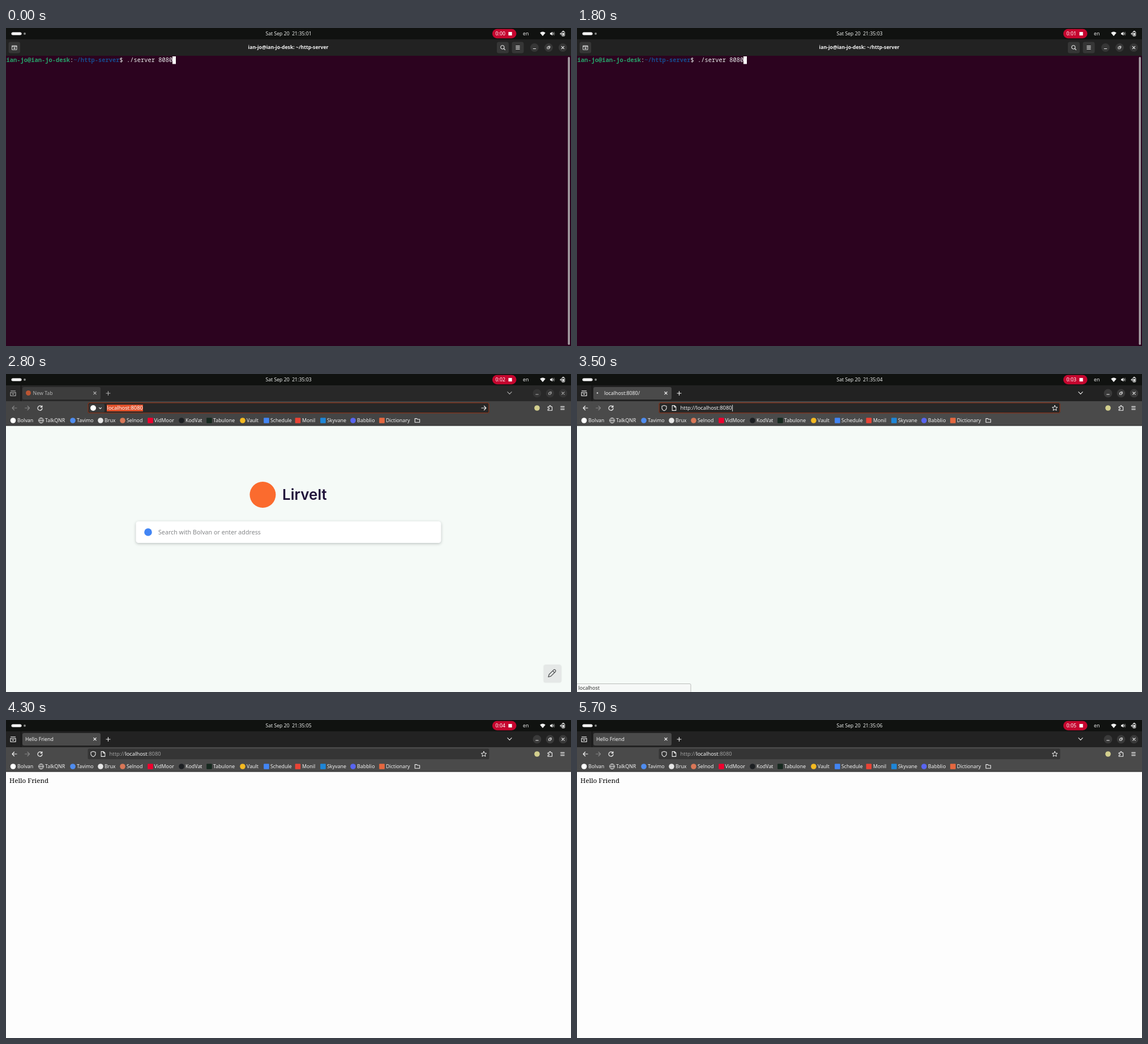
An HTML page with a canvas for the animation above (5.8 s loop, 998x561 px).

```html
<!DOCTYPE html>
<html lang="en">
<head>
<meta charset="utf-8">
<title>HTTP server demo</title>
<style>
html, body { margin: 0; width: 100%; height: 100%; overflow: hidden; background: #101210; }
canvas { display: block; width: 998px; height: 561px; }
</style>
</head>
<body>
<canvas id="stage" width="998" height="561"></canvas>
<script>
const ctx = document.getElementById('stage').getContext('2d');
const LOOP = 5800;
const SANS = '"Noto Sans", "Open Sans", sans-serif';
const MONO = '"Noto Sans Mono", "DejaVu Sans Mono", monospace';
const SERIF = '"Noto Serif", serif';
const CELL = 6.25;
const ROW = 13.6;
const HOST = 'ian-jo@ian-jo-desk';

// Moments of change, in ms
const T = { output: 2000, blur: 2600, browser: 2800, focus: 2900, load: 3200, done: 3600 };
const CLOCK_TICKS = [800, 1800, 2900, 3800, 4800];

// [label, icon x, text x, colour, shape]
const BOOKMARKS = [
  ['Bolvan', 12.5, 20, '#ffffff', 'dot'],
  ['TalkQNR', 62, 69, '#e4e4e4', 'globe'],
  ['Tavimo', 118, 125, '#4f8df0', 'dot'],
  ['Brux', 167, 174, '#e6e6e6', 'dot'],
  ['Selnod', 206, 213, '#d97757', 'dot'],
  ['VidMoor', 255, 261.5, '#f0002e', 'box'],
  ['KodVat', 310, 317, '#1c1f22', 'dot'],
  ['Tabulone', 359, 366, '#16291f', 'box'],
  ['Vault', 418, 425, '#f4b921', 'dot'],
  ['Schedule', 460, 467, '#4285f4', 'box'],
  ['Monil', 515.5, 523, '#ea4335', 'box'],
  ['Skyvane', 560, 567, '#1e86d8', 'box'],
  ['Babblio', 613, 620, '#5865f2', 'dot'],
  ['Dictionary', 664, 671, '#e5673f', 'box']
];

function rect(x, y, w, h, color, r = 0) {
  ctx.fillStyle = color;
  ctx.beginPath();
  ctx.roundRect(x, y, w, h, r);
  ctx.fill();
}

function frame(x, y, w, h, color, r = 0, width = 1) {
  ctx.strokeStyle = color;
  ctx.lineWidth = width;
  ctx.beginPath();
  ctx.roundRect(x, y, w, h, r);
  ctx.stroke();
}

function dot(x, y, r, color) {
  ctx.fillStyle = color;
  ctx.beginPath();
  ctx.arc(x, y, r, 0, Math.PI * 2);
  ctx.fill();
}

// Path data is relative to the icon centre
function icon(x, y, data, color, width = 1.1, filled = false) {
  ctx.save();
  ctx.translate(x, y);
  ctx.lineCap = ctx.lineJoin = 'round';
  ctx.lineWidth = width;
  ctx.fillStyle = ctx.strokeStyle = color;
  const path = new Path2D(data);
  if (filled) ctx.fill(path);
  else ctx.stroke(path);
  ctx.restore();
}

function text(str, x, y, size, color, family = SANS, weight = 400, align = 'left') {
  ctx.font = `${weight} ${size}px ${family}`;
  ctx.textAlign = align;
  ctx.fillStyle = color;
  ctx.fillText(str, x, y);
  return ctx.measureText(str).width;
}

function runs(parts, x, y, size) {
  for (const [str, color] of parts) x += text(str, x, y, size, color);
}

const CROSS = 'M-2.2 -2.2L2.2 2.2M2.2 -2.2L-2.2 2.2';
const MENU = 'M-3.2 -2.6H3.2M-3.2 0H3.2M-3.2 2.6H3.2';
const PLUS = 'M-3.5 0H3.5M0 -3.5V3.5';
const RESTORE = 'M-2.2 -1H1V2.2H-2.2ZM-0.6 -2.4H2.4V0.6';
const ARROW_LEFT = 'M4 0H-4M-0.6 -3.5L-4 0L-0.6 3.5';
const ARROW_RIGHT = 'M-4 0H4M0.6 -3.5L4 0L0.6 3.5';
const RELOAD = 'M3.4 -2A4 4 0 1 0 4 0.6M3.8 -4.2V-1.4H1';
const GLOBE = 'M-4.6 0A4.6 4.6 0 1 0 4.6 0A4.6 4.6 0 1 0 -4.6 0H4.6M0 -4.6C-3 -2 -3 2 0 4.6C3 2 3 -2 0 -4.6';
const SHIELD = 'M0 -4.6L4 -3.2V0C4 2.4 2 4 0 4.8C-2 4 -4 2.4 -4 0V-3.2Z';
const PAGE = 'M-3.3 -4.4H0.8L3.3 -1.8V4.4H-3.3ZM0.6 -4.2V-1.6H3.2';
const STAR = 'M0 -4.6L1.4 -1.5L4.7 -1.2L2.2 1L3 4.3L0 2.5L-3 4.3L-2.2 1L-4.7 -1.2L-1.4 -1.5Z';
const PUZZLE = 'M-3.8 -2.2H-1.2V-3.2A1.2 1.2 0 0 1 1.2 -3.2V-2.2H3.6V4.2H-3.8V2.2H-2.6A1.2 1.2 0 0 0 -2.6 -0.2H-3.8Z';
const FOLDER = 'M-4.2 -3.2H-0.8L0.4 -1.8H4.2V3.5H-4.2Z';
const TABS = 'M-4.5 -1.8H4.5V4.5H-4.5ZM-4 -4.2H4M-1.6 0.4L0 2L1.6 0.4';
const PENCIL = 'M-6.5 6.5L-5.2 2L3 -6.2Q4.5 -7.2 5.8 -5.8Q7.2 -4.5 6.2 -3L-2 5.2ZM1.2 -4.4L4.4 -1.2';

function topBar(t) {
  rect(0, 0, 998, 20, '#101210');
  rect(9.5, 7.5, 18, 5, '#ffffff', 2.5);
  dot(33, 10, 1.9, '#858785');

  const second = 1 + CLOCK_TICKS.filter(at => t >= at).length;
  text('Sat Sep 20  21:35:0' + second, 499, 12.8, 8.7, '#e9ebe9', SANS, 400, 'center');

  rect(859, 1.8, 42.5, 16.4, '#c5062f', 8.2);
  text('0:0' + Math.floor((t + 100) / 1000), 864.5, 13, 8.8, '#ffffff');
  rect(887.5, 7, 6.2, 6.2, '#ffffff');
  text('en', 913, 13, 8.8, '#e9ebe9');

  icon(948, 10, 'M0 4.2L-4.8 -1.6Q0 -5.4 4.8 -1.6Z', '#f2f2f2', 1, true);
  icon(965, 10, 'M-4 -1.4H-2.2L0.2 -3.6V3.6L-2.2 1.4H-4Z', '#f2f2f2', 1, true);
  icon(965, 10, 'M1.6 -1.6Q2.8 0 1.6 1.6', '#f2f2f2', 1);
  icon(965, 10, 'M3 -3.2Q5.4 0 3 3.2', '#777977', 1);
  frame(981.8, 6.4, 5, 7.8, '#f2f2f2', 1, 1);
  rect(983, 5, 2.6, 1.4, '#f2f2f2');
  rect(983, 8.4, 2.6, 4.8, '#f2f2f2');
  icon(980, 10.2, 'M0.6 -3L-2 0.6H0L-0.8 3L1.8 -0.6H0Z', '#f2f2f2', 1, true);
}

function terminal(t) {
  rect(0, 20, 998, 29, '#222222');
  rect(0, 49, 998, 512, '#2c031f');

  rect(4.5, 24.5, 20.5, 20, '#363636', 3.5);
  icon(15, 34.5, 'M-4 -3.2H4V3.8H-4ZM-4 -1.8H4M0 -0.5V2.7M-1.6 1.1H1.6', '#eeeeee', 0.9);
  text(HOST + ': ~/http-server', 498.5, 37.3, 8.7, '#f5f5f5', SANS, 700, 'center');
  rect(867, 24.5, 21, 20, '#363636', 3.5);
  icon(877.5, 34.5, 'M-3.7 -0.6A3.1 3.1 0 1 0 2.5 -0.6A3.1 3.1 0 1 0 -3.7 -0.6M1.7 1.7L4 4', '#eeeeee');
  rect(893.5, 24.5, 21, 20, '#363636', 3.5);
  icon(904, 34.5, MENU, '#eeeeee');
  for (const x of [933.5, 958.5, 983.5]) dot(x, 34.5, 7.4, '#363636');
  icon(933.5, 34.5, 'M-2.2 2H2.2', '#eeeeee');
  icon(958.5, 34.5, RESTORE, '#eeeeee', 0.9);
  icon(983.5, 34.5, CROSS, '#eeeeee');
  rect(992.5, 51, 3.5, 508, '#a79fa4', 1.7);

  const size = CELL / 0.6;
  const line = (str, col, row, color, weight) =>
    text(str, 0.5 + col * CELL, 60.4 + row * ROW, size, color, MONO, weight);
  const ink = '#eef3f1';
  line(HOST, 0, 0, '#26a269', 700);
  line(':', 18, 0, ink);
  line('~/http-server', 19, 0, '#174a8c', 700);
  line('$ ./server 8080', 32, 0, ink);
  if (t < T.output) {
    rect(294, 50, 6, 13.5, '#ffffff');
    return;
  }
  line('server listening on port 8080', 0, 1, ink);
  if (t < T.blur) rect(0.5, 77.2, 6.2, 13.6, '#ffffff');
  else frame(0.9, 77.5, 6, 13.4, '#f2eef1');
}

function newTabPage() {
  dot(453.5, 213, 23, '#fb6b2e');
  text('Lirvelt', 488, 221.5, 26, '#20123a', 'Inter, sans-serif', 600);
  ctx.save();
  ctx.shadowColor = 'rgba(40, 45, 50, 0.28)';
  ctx.shadowBlur = 5;
  ctx.shadowOffsetY = 1.5;
  rect(229.5, 260, 539, 38, '#ffffff', 4.5);
  ctx.restore();
  dot(251, 279, 6.8, '#4285f4');
  text('Search with Bolvan or enter address', 269, 282.5, 10.7, '#858789');
  ctx.save();
  ctx.shadowColor = 'rgba(40, 45, 50, 0.2)';
  ctx.shadowBlur = 2;
  rect(950, 513.5, 30.5, 30.5, '#e5e8e7', 3);
  ctx.restore();
  icon(964.5, 528, PENCIL, '#4b4d4f', 1.2);
}

function addressBar(state) {
  const ink = '#f0f0f0';
  const editing = state !== 'done';
  rect(144.5, 50.5, 709, 18.7, editing ? '#272727' : '#353535', 2.5);
  if (editing) frame(145, 50.8, 708, 18, '#a53c1c', 2.5);

  if (state === 'new') {
    rect(147, 52.5, 27, 15, '#3a3a3a', 2);
    dot(154, 60, 5, '#ffffff');
    icon(166.5, 60.3, 'M-2 -1L0 1L2 -1', ink);
    rect(178, 54, 64, 12, '#e0502a');
    text('localhost:8080', 178.5, 63.2, 9.35, '#ffffff');
    icon(844, 60, ARROW_RIGHT, ink, 1.2);
    return;
  }
  icon(154, 60, SHIELD, ink);
  icon(171.5, 60, PAGE, ink);
  icon(844, 60, STAR, ink, 1);
  const side = editing ? '#f5f5f5' : '#a0a0a0';
  runs([['http://', side], ['localhost', '#f8f8f8'], [':8080', side]], 182.5, 63.2, 9.35);
  if (editing) rect(274.2, 54.5, 0.9, 11.5, '#ffffff');
}

function browser(t) {
  const state = t < T.load ? 'new' : t < T.done ? 'loading' : 'done';
  const active = t >= T.focus;
  const ink = active ? '#f4f4f4' : '#b2b2b2';
  const faint = '#858585';

  rect(0, 20, 998, 28, active ? '#222222' : '#282828');
  rect(0, 48, 998, 43, active ? '#4a4a4a' : '#444444');
  rect(0, 91, 998, 470, state === 'done' ? '#fdfdfd' : '#f5faf7');
  rect(0, 90.6, 998, 1, '#1e1e1e');

  icon(12.5, 34, TABS, ink);
  rect(26, 20, 1, 28, '#111111');
  rect(29, 23, 138, 22, active ? '#4a4a4a' : '#3d3d3d', 3);
  if (state === 'new') {
    dot(39.5, 33.5, 4.5, active ? '#fb6b2e' : '#bb5532');
    text('New Tab', 47.5, 36.8, 8.8, ink);
  } else if (state === 'loading') {
    dot(40 - 4 * Math.cos((t - 3500) / 1100 * Math.PI * 2), 33.5, 1.3, '#d8d8d8');
    text('localhost:8080/', 48, 36.8, 8.8, ink);
  } else {
    text('Hello Friend', 34, 36.8, 8.8, ink);
  }
  icon(157, 33.7, CROSS, ink);
  icon(180.5, 34, PLUS, ink);
  icon(889.5, 33.5, 'M-3.6 -1.8L0 1.8L3.6 -1.8', ink);
  for (const x of [938, 961, 984]) dot(x, 34, 7.4, active ? '#3a3a3a' : '#343434');
  icon(938, 34, 'M-2.2 2H2.2', ink);
  icon(961, 34, RESTORE, ink, 0.9);
  icon(984, 34, CROSS, ink);

  icon(15, 60, ARROW_LEFT, state === 'new' ? faint : ink, 1.2);
  icon(37.5, 60, ARROW_RIGHT, faint, 1.2);
  icon(60, 60, RELOAD, '#f4f4f4', 1.2);
  addressBar(state);
  dot(938, 60, 4.8, '#d3cf8e');
  icon(961, 60, PUZZLE, '#f0f0f0');
  icon(983, 60, MENU, '#f0f0f0');

  for (const [label, x, tx, color, shape] of BOOKMARKS) {
    if (shape === 'globe') icon(x, 82, GLOBE, color, 0.9);
    else if (shape === 'dot') dot(x, 82, 4.8, color);
    else rect(x - 4.8, 77.2, 9.6, 9.6, color, 1);
    text(label, tx, 85, 8.85, '#f2f2f2');
  }
  icon(726.5, 81.8, FOLDER, '#f0f0f0');

  if (state === 'new') newTabPage();
  if (state === 'loading') {
    rect(-2, 546.5, 203, 16, '#f6f8f7', 2);
    frame(-2, 546.5, 203, 16, '#b9bcba', 2);
    text('localhost', 2.5, 557.2, 8.85, '#303230');
  }
  if (state === 'done') text('Hello Friend', 6, 111, 11.6, '#000000', SERIF);
}

function draw(now) {
  const t = Math.floor((now % LOOP) / 100) * 100;
  if (t < T.browser) terminal(t);
  else browser(t);
  topBar(t);
}

const start = performance.now();
function loop() {
  draw(performance.now() - start);
  requestAnimationFrame(loop);
}
loop();
</script>
</body>
</html>
```
